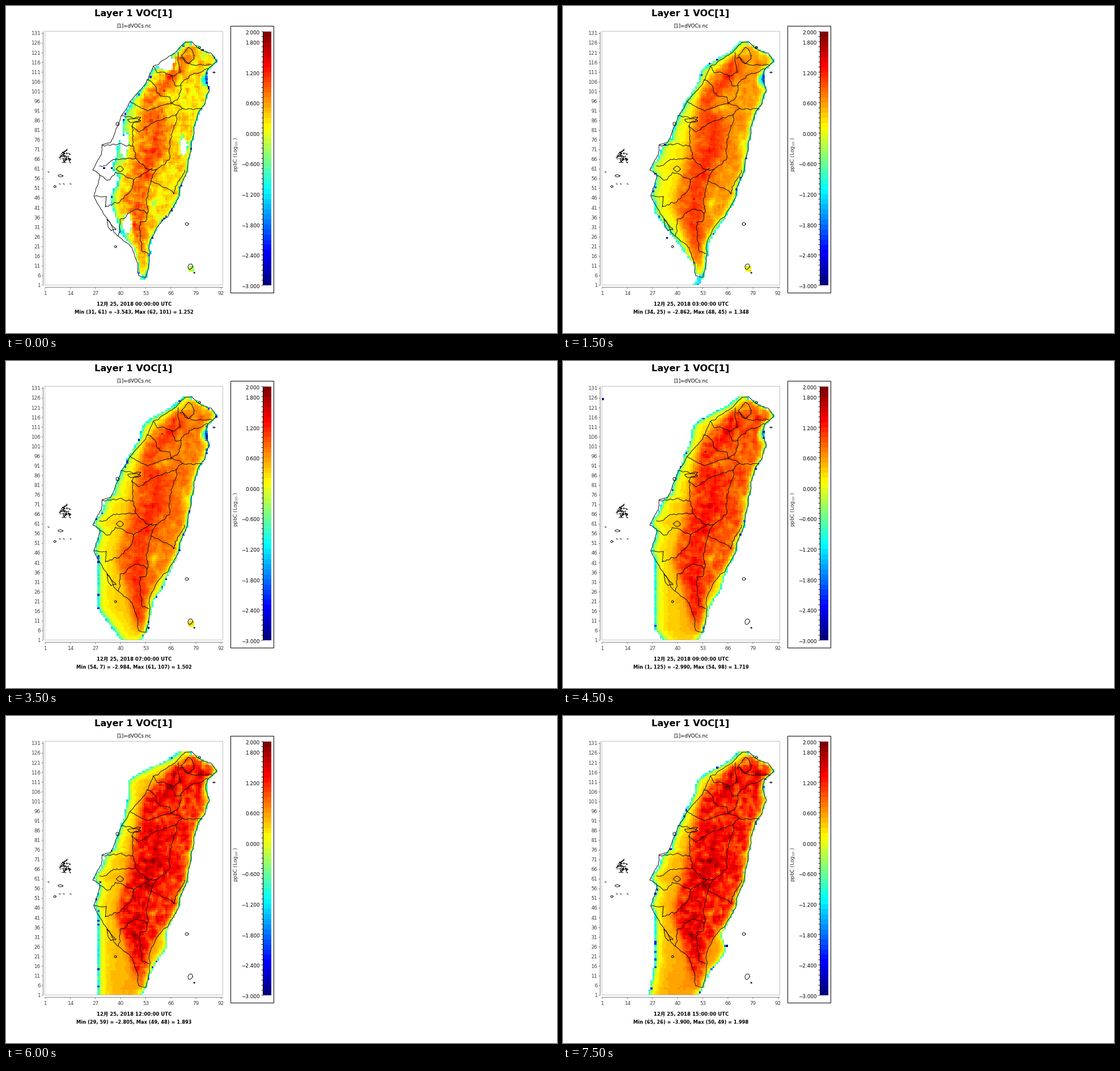
Recreate the animation shown at these times as a matplotlib script. Size 972 by 576 pixels, loop 8000 ms.

```python
import numpy as np
import matplotlib.pyplot as plt
from matplotlib.animation import FuncAnimation
from matplotlib.colors import ListedColormap
from matplotlib.patches import Rectangle

plt.rcParams["font.family"] = ["DejaVu Sans", "Noto Sans CJK JP"]
plt.rcParams["path.snap"] = False

W, H = 972, 576
COLS, ROWS = 92, 131
LEFT, RIGHT, TOP, BOTTOM = 69, 383, 45, 492
DX, DY = (RIGHT - LEFT) / COLS, (BOTTOM - TOP) / ROWS
VMIN, VMAX, LEVELS = -3.0, 2.0, 50
HOURS = 16

fig = plt.figure(figsize=(W / 72, H / 72), dpi=72, facecolor="white")
ax = fig.add_axes([0, 0, 1, 1])
ax.axis("off")
rng = np.random.default_rng(7)

# blue-cyan-yellow-red ramp built from three shifted trapezoids
ramp = np.linspace(0, 1, LEVELS)[:, None]
cmap = ListedColormap(np.clip(1.5 - np.abs(4 * ramp - [3, 2, 1]), 0, 1))


# ---------- coast and county borders ----------
def border(*xy, rough=0.1):
    p = np.array(xy, float).reshape(-1, 2)
    for _ in range(4):
        a, b = p[:-1], p[1:]
        size = np.hypot(*(b - a).T)[:, None]
        m = (a + b) / 2 + rng.normal(size=a.shape) * np.minimum(size * rough, 1.2)
        p = np.vstack([np.stack([a, m], 1).reshape(-1, 2), p[-1:]])
    ax.plot(*p.T, color="black", lw=0.9)
    return p


def ring(x, y, rx, ry, n=13):
    t = np.linspace(0, 2 * np.pi, n)
    k = rng.uniform(0.75, 1.15, n)
    k[-1] = k[0]
    ax.plot(x + rx * k * np.cos(t), y + ry * k * np.sin(t), color="black", lw=0.9)


east_coast = border(
    316, 64, 328, 63, 337, 73, 348, 79, 362, 83, 372, 97, 356, 111, 352, 127, 359, 149, 352, 168,
    335, 203, 332, 222, 326, 255, 316, 300, 305, 337, 285, 372, 264, 394, 253, 423, 252, 455,
    247, 478, rough=0.05)
west_coast = border(
    247, 478, 234, 475, 232, 452, 218, 421, 190, 398, 170, 361, 155, 335, 165, 296, 153, 289,
    168, 262, 170, 244, 184, 241, 203, 194, 220, 167, 246, 138, 260, 106, 292, 87, 316, 64,
    rough=0.05)

border(304, 82, 305, 103, 308, 117, 292, 123, 266, 117, 260, 106)
border(292, 123, 298, 140, 309, 139, 302, 165, 291, 173)
border(306, 92, 330, 104, 363, 104)
border(356, 111, 325, 122, 308, 138)
border(248, 130, 262, 138, 271, 157, 289, 160, 291, 170)
border(219, 168, 250, 185, 291, 170, 312, 181, 347, 181)
border(204, 193, 238, 196, 222, 211, 223, 246, 229, 268)
border(222, 211, 236, 221, 256, 207, 280, 198, 300, 191, 312, 180)
border(300, 191, 294, 222, 288, 271, 266, 288)
border(169, 245, 190, 243, 223, 247)
border(165, 282, 190, 270, 229, 268, 246, 286, 266, 288)
border(165, 298, 178, 307, 193, 293, 211, 301, 225, 307, 258, 286)
border(157, 335, 177, 335, 175, 354, 198, 347, 222, 323, 225, 307)
border(198, 405, 201, 376, 228, 358, 247, 364, 247, 379, 236, 381, 237, 408, 241, 433, 252, 436)
border(249, 367, 247, 342, 256, 308, 266, 288)
border(256, 308, 296, 331, 302, 315, 315, 289)
border(178, 376, 194, 394, 185, 396, 178, 376)

for spot in [(322, 87, 11, 13), (225, 202, 12, 4), (201, 287, 6, 5), (197, 208, 3, 3),
             (319, 384, 3, 3), (325, 459, 4, 5), (332, 470, 1, 1), (367, 117, 2, 1),
             (193, 424, 2, 2), (341, 73, 2, 2), (86, 318, 2, 2), (96, 299, 4, 2)]:
    ring(*spot)

# scattered archipelago: short random walks
for start in rng.normal((105, 266), (5.5, 6), (34, 2)):
    walk = start + np.cumsum(rng.normal(0, 1.3, (5, 2)), axis=0)
    ax.plot(*walk.T, color="black", lw=0.9)
for x in (75, 95, 102, 114):
    segment_y = 292 if x < 80 else 313
    ax.plot([x - 1, x + 1], [segment_y, segment_y + 1], color="black", lw=1)

# ---------- concentration field ----------
X, Y = np.meshgrid(LEFT + DX * (np.arange(COLS) + 0.5), TOP + DY * (np.arange(ROWS) + 0.5))
rows_y = Y[:, 0]


def coast_x(path):
    near = [path[np.abs(path[:, 1] - y) < 5, 0].mean() for y in np.clip(rows_y, 64, 475)]
    return np.array(near) - 0.8 * np.clip(rows_y - 478, 0, None)


def smooth(a, n):
    for _ in range(n):
        a = (4 * a + sum(np.roll(a, s, k) for s in (-1, 1) for k in (0, 1))) / 8
    return a / a.std()


def step(a):
    a = np.clip(a, 0, 1)
    return a * a * (3 - 2 * a)


def bell(a, mid, width):
    return np.exp(-((a - mid) / width) ** 2)


def blob(x, y, rx, ry):
    return bell(X, x, rx) * bell(Y, y, ry)


def profile(ys, xs):
    return np.interp(rows_y, ys, xs)[:, None]


shore_w, shore_e = coast_x(west_coast), coast_x(east_coast)
grain = smooth(rng.normal(size=X.shape), 2)
foot = profile([62, 105, 145, 200, 290, 350, 410, 480], [325, 275, 240, 228, 210, 192, 212, 230])
crest = profile([62, 125, 165, 235, 300, 360, 475], [325, 290, 253, 268, 240, 232, 237])
hills = step((X - foot) / 24 + 0.4) * step((shore_e[:, None] - X + 4) / 15)
ridge = bell(X, crest, 14 + 10 * bell(Y, 235, 40))

# readings at a few hours: lowest cell and value, highest cell and value
KEYS = np.array([0, 3, 5, 7, 9, 12, 15])
READINGS = np.array([
    (31, 61, -3.543, 62, 101, 1.252), (34, 25, -2.862, 48, 45, 1.348),
    (30, 66, -2.491, 48, 44, 1.420), (54, 7, -2.984, 61, 107, 1.502),
    (1, 125, -2.990, 54, 98, 1.719), (29, 59, -2.805, 49, 48, 1.893),
    (65, 26, -3.900, 50, 49, 1.998)])


def reading(hour):
    near = READINGS[np.argmin(np.abs(KEYS - hour))].astype(int)
    lo, hi = (np.interp(hour, KEYS, READINGS[:, c]) for c in (2, 5))
    return near[0], near[1], lo, near[3], near[4], hi


def plume(hour, early):
    """West and east limits of the coloured area, row by row."""
    north = (12 + 28 * bell(hour, 11.5, 3)) * bell(rows_y, 115, 45) * (1 - early)
    west = shore_w - north + 4 * bell(rows_y, 250, 20) + 33 * early * bell(rows_y, 305, 80)
    front = 162 + 0.75 * np.clip(rows_y - 365 - 18 * (hour - 3), 0, None)
    front -= 0.18 * step((hour - 12) / 3) * np.clip(rows_y - 430, 0, None)
    west = np.where(rows_y > 340, west + (np.minimum(west, front) - west) * (1 - early), west)
    east = shore_e + 1.5 + 2 * hour * bell(rows_y, 385 + 2 * hour, 28)
    return west, east


def field(hour):
    r = np.random.default_rng(100 + hour)
    early, mid = np.clip(1 - hour / 2.5, 0, 1), np.clip(hour / 3, 0, 1)
    late = step((hour - 6) / 7)

    west, east = plume(hour, early)
    slope = np.clip(np.gradient(west, rows_y), -1.5, 1.5)
    d_w = (X - west[:, None]) / np.hypot(1, slope)[:, None]
    d_e = east[:, None] - X
    inside = (d_w > 0) & (d_e > 0) & (Y > 62) & (Y < 482 + 50 * (1 - early))

    low = 0.25 + 0.025 * hour
    hill = 0.62 + 0.24 * (1 - np.exp(-hour / 1.5)) + 0.42 * late
    drop = 0.28 * np.exp(-hour / 4) + 0.04
    south = np.clip((490 - Y) / (35 + 40 * late), 0, 1)
    v = low - (low + 0.8) * (0.7 * np.exp(-d_w / 6) + 0.3 * np.exp(-d_w / 25))
    v += (hill - drop * step((X - crest - 10) / 25) - low) * hills * south
    v += (0.3 - 0.009 * hour) * ridge * south
    v -= 1.1 * np.exp(-d_e / (3 + 3 * mid))
    v += (0.07 + 0.07 * early + 0.11 * late) * grain * np.maximum(hills, 0.1 + 0.8 * early)

    # cool basins and valleys, then the hot northern hills
    v -= 0.45 * mid * (blob(268, 185, 8, 5) + blob(281, 178, 8, 5))
    v -= 0.35 * (1 - 0.5 * late) * (blob(262, 348, 10, 16) + blob(317, 238, 7, 16))
    v -= 0.4 * mid * blob(318, 82, 16, 14) + 1.3 * (1 - late) * blob(350, 130, 7, 9)
    v += 0.25 * late * blob(338, 101, 14, 7)

    # gaps in the thin midnight layer
    for x, y, rx, ry in [(284, 100, 15, 12), (214, 383, 8, 18), (313, 248, 6, 14), (209, 245, 7, 22)]:
        q = np.hypot((X - x) / rx, (Y - y) / ry) + 0.12 * grain
        inside &= q > 1.4 * early - 0.4
        v -= early * np.exp(-5 * np.abs(q - 1))

    rim = np.minimum(d_w, d_e) < 3.4
    v -= rim * (r.uniform(0, 0.6, X.shape) + 1.3 * (r.random(X.shape) < 0.06))
    i0, j0, lo, i1, j1, hi = reading(hour)
    v = np.where(inside, np.clip(v, -2.6, hi - 0.02), np.nan)
    if hour < 8:
        v[-10:-7, 74:77] = r.uniform(-0.6, 0.1, (3, 3)) + 0.35 * mid
    v[ROWS - j0, i0 - 1], v[ROWS - j1, i1 - 1] = lo, hi
    return v


fields = [field(h) for h in range(HOURS)]
image = ax.imshow(fields[0], cmap=cmap, vmin=VMIN, vmax=VMAX, aspect="auto",
                  extent=(LEFT, RIGHT, BOTTOM, TOP), interpolation="nearest")


# ---------- frame, axes and legend ----------
def segment(x0, y0, x1, y1, color="#808080", lw=1):
    ax.plot([x0, x1], [y0, y1], color=color, lw=lw, solid_capstyle="butt")


def box(x0, y0, x1, y1, color):
    ax.add_patch(Rectangle((x0, y0), x1 - x0, y1 - y0, fill=False, ec=color, lw=1))


def label(x, y, s, size, ha="center", **kw):
    return ax.text(x, y, s, fontsize=size, ha=ha, va="baseline", **kw)


box(LEFT - 0.5, TOP - 0.5, RIGHT - 0.5, BOTTOM - 0.5, "#c0c0c0")
segment(65.5, TOP, 65.5, BOTTOM)
segment(LEFT, 495.5, RIGHT, 495.5)
for j in range(1, ROWS + 1, 5):
    y = BOTTOM - DY * (j - 1)
    segment(63, y, 65.5, y)
    label(60.5, y + 3, str(j), 8.9, "right", color="#404040")
for i in range(1, COLS + 1, 13):
    x = LEFT + DX * (i - 1)
    segment(x, 495.5, x, 498.5)
    label(x, 509.3, str(i), 8.9, color="#404040")

box(396.5, 35.5, 472.5, 505.5, "black")
ax.imshow(np.arange(LEVELS)[::-1, None], cmap=cmap, aspect="auto", interpolation="nearest",
          extent=(453.5, 467, BOTTOM, TOP))
ax.set_xlim(0, W)
ax.set_ylim(H, 0)
segment(453.5, TOP, 453.5, BOTTOM, "black")
for k in range(LEVELS + 1):
    y = BOTTOM - k * (BOTTOM - TOP) / LEVELS
    segment(450.5, y, 453.5, y, "black", 0.8)
    if k % 6 == 0 or k == LEVELS:
        value = round(VMIN + 0.1 * k, 3) + 0.0
        label(447.5, y + 5, f"{value:.3f}".replace("-", "\u2212"), 8.9, "right")
ax.text(406, 261, "ppbC (Log$_{10}$ )", fontsize=8.9, rotation=90, ha="center", va="center",
        color="#303030")

label(225, 18.2, "Layer 1 VOC[1]", 16.2, weight="bold")
label(226, 37.2, "[1]=dVOCs.nc", 8.6)
clock = label(226, 528, "", 8.5, weight="bold")
summary = label(225.5, 542.3, "", 8.3, weight="bold")


def update(hour):
    image.set_data(fields[hour])
    i0, j0, lo, i1, j1, hi = reading(hour)
    clock.set_text(f"12月 25, 2018 {hour:02d}:00:00 UTC")
    summary.set_text(f"Min ({i0}, {j0}) = \u2013{-lo:.3f}, Max ({i1}, {j1}) = {hi:.3f}")
    return image, clock, summary


update(0)
anim = FuncAnimation(fig, update, frames=HOURS, interval=500, repeat=True, repeat_delay=0, blit=False)
plt.show()
```
